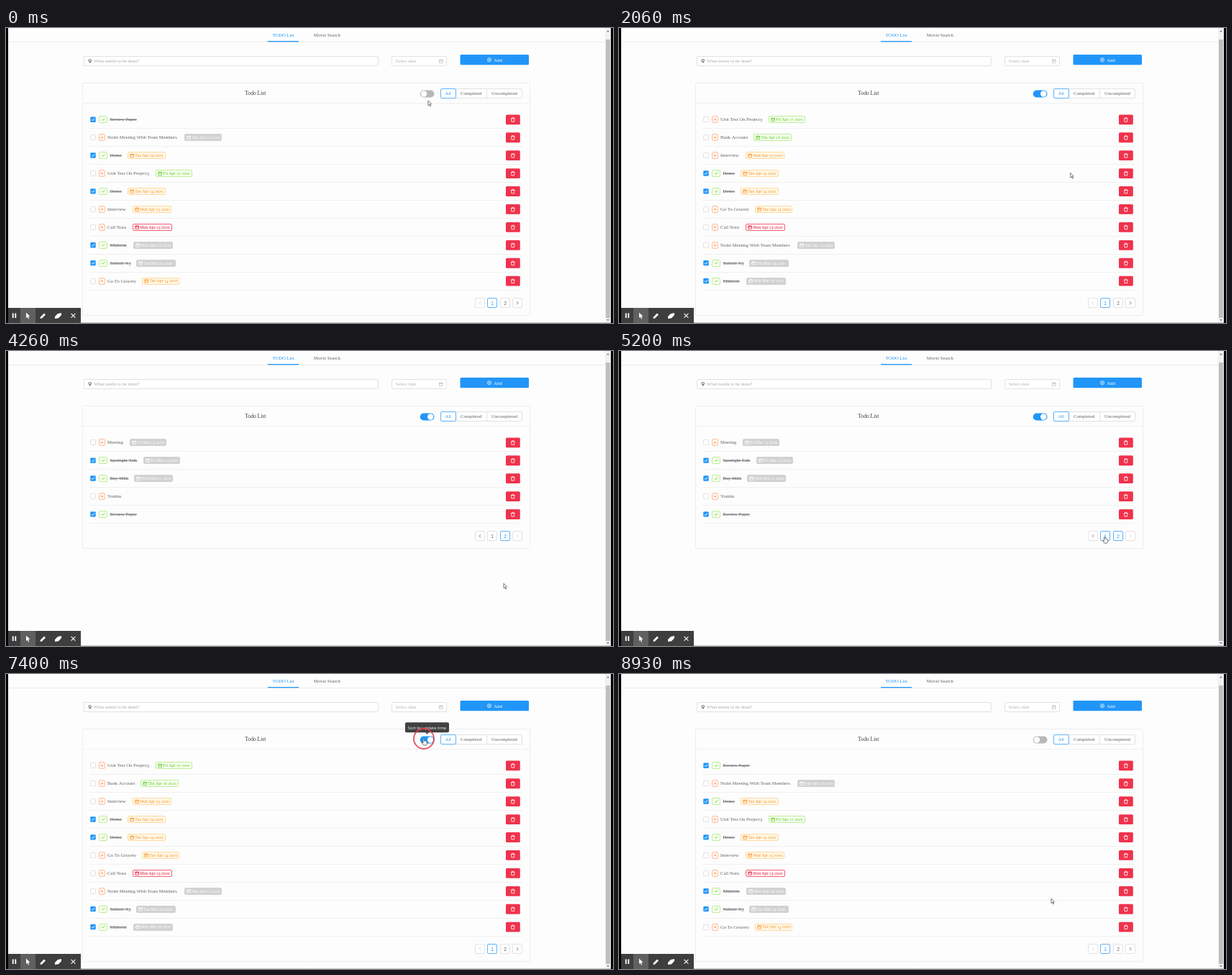
An HTML page with a canvas that plays this animation: 844 px wide and 410 px high, repeating every 9000 ms.

```html
<!DOCTYPE html>
<html lang="en">
<head>
<meta charset="utf-8">
<title>Todo List</title>
<style>
html, body { margin: 0; width: 100%; height: 100%; overflow: hidden; background: #fdfdfd; }
canvas { display: block; }
</style>
</head>
<body>
<canvas id="stage" width="844" height="410"></canvas>
<script>
const ctx = document.getElementById('stage').getContext('2d');
const LOOP = 9000, ROW = 24.93;
const SERIF = '"Liberation Serif", serif';
const SANS = '"Liberation Sans", sans-serif';
const BLUE = '#2196f8', TEXT = '#626262', LINE = '#e2e2e2', FAINT = '#f0f0f0';

// background, border, text
const TONES = {
  green: ['#f6ffed', '#bfed9c', '#58c722'],
  orange: ['#fff7e6', '#ffdba3', '#fa9022'],
  red: ['#fff0f0', '#f2667c', '#dc1f42'],
  gray: ['#d2d2d2', '#d2d2d2', '#ffffff'],
  minus: ['#fff2e8', '#ffc3a3', '#fa6a38']
};

// name, done, date, tone, tag left, tag right
const task = (name, done, date, tone, left, right) => ({ name, done, date, tone, left, right });
const review = task('Review Paper', true);
const zone = task('Nolm Meeting With Team Members', false, 'Sun Apr 12 2020', 'gray', 248, 300);
const demo = task('Demo', true, 'Tue Apr 14 2020', 'orange', 169, 222);
const unit = task('Unit Test On Project3', false, 'Fri Apr 17 2020', 'green', 208, 259);
const interview = task('Interview', false, 'Wed Apr 15 2020', 'orange', 176, 230);
const call = task('Call Nora', false, 'Mon Apr 13 2020', 'red', 176, 231);
const midterm = task('Midterm', true, 'Mon Mar 16 2020', 'gray', 177, 232);
const submit = task('Submit A3', true, 'Tue Mar 24 2020', 'gray', 181, 236);
const grocery = task('Go To Grocery', false, 'Tue Apr 14 2020', 'orange', 189, 241);
const bank = task('Bank Account', false, 'Thu Apr 16 2020', 'green', 187, 240);

const byUpdate = [review, zone, demo, unit, demo, interview, call, midterm, submit, grocery];
const byDate = [unit, bank, interview, demo, demo, grocery, call, zone, submit, midterm];
const secondPage = [
  task('Meeting', false, 'Fri Mar 13 2020', 'gray', 172, 223),
  task('Spotlight Talk', true, 'Fri Mar 13 2020', 'gray', 191, 242),
  task('Buy Milk', true, 'Wed Mar 11 2020', 'gray', 178, 232),
  task('Yombu', false),
  review
];

// time, x, y of the pointer tip
const PATH = [
  [0, 587, 101], [60, 587, 101], [450, 589, 92], [1600, 589, 92], [2700, 691, 380],
  [4130, 691, 380], [4260, 692, 323], [4950, 675.5, 258], [6060, 675.5, 258],
  [7080, 581, 90], [7850, 581, 90], [8900, 601, 312], [9000, 601, 312]
];
const HAND = [[300, 1640], [2620, 3400], [4800, 6110], [6980, 7930]];
const TIP = [[430, 1700], [7080, 7980]];
const CLICKS = [[1130, 1310], [3060, 3200], [5400, 5580], [7330, 7540]];

const clamp = v => Math.max(0, Math.min(1, v));
const ease = v => v * v * (3 - 2 * v);
const ramp = (t, a, b) => ease(clamp((t - a) / (b - a)));
const within = (t, spans) => spans.some(([a, b]) => t >= a && t < b);

function box(x, y, w, h, r, fill, stroke) {
  ctx.beginPath();
  if (stroke) ctx.roundRect(x + .5, y + .5, w - 1, h - 1, r);
  else ctx.roundRect(x, y, w, h, r);
  if (fill) { ctx.fillStyle = fill; ctx.fill(); }
  if (stroke) { ctx.strokeStyle = stroke; ctx.lineWidth = 1; ctx.stroke(); }
}

function line(points, color, width = 1) {
  ctx.beginPath();
  for (let i = 0; i < points.length; i += 2) ctx.lineTo(points[i], points[i + 1]);
  ctx.strokeStyle = color;
  ctx.lineWidth = width;
  ctx.stroke();
}

function shape(points, fill, stroke) {
  ctx.beginPath();
  for (let i = 0; i < points.length; i += 2) ctx.lineTo(points[i], points[i + 1]);
  ctx.closePath();
  ctx.fillStyle = fill;
  ctx.fill();
  if (stroke) { ctx.strokeStyle = stroke; ctx.lineWidth = .8; ctx.stroke(); }
}

function circle(x, y, r, fill, stroke, width = 1) {
  ctx.beginPath();
  ctx.arc(x, y, r, 0, Math.PI * 2);
  if (fill) { ctx.fillStyle = fill; ctx.fill(); }
  if (stroke) { ctx.strokeStyle = stroke; ctx.lineWidth = width; ctx.stroke(); }
}

function label(s, x, y, color, size = 6.67, center = false, family = SERIF) {
  ctx.font = size + 'px ' + family;
  ctx.fillStyle = color;
  const total = ctx.measureText(s).width;
  if (center) x -= total / 2;
  if (family !== SERIF) {
    ctx.fillText(s, x, y);
    return total;
  }
  // Old-style figures: low 0-2, hanging 3, 4, 5, 7 and 9.
  for (const part of s.split(/(\d)/)) {
    ctx.save();
    ctx.translate(x, y);
    if (/^[012]$/.test(part)) ctx.scale(1, .74);
    if (/^[34579]$/.test(part)) ctx.translate(0, size * .19);
    ctx.fillText(part, 0, 0);
    ctx.restore();
    x += ctx.measureText(part).width;
  }
  return total;
}

function calendar(x, y, color) {
  ctx.strokeStyle = color;
  ctx.lineWidth = .7;
  ctx.strokeRect(x, y - 1.8, 4.6, 4.1);
  line([x, y - .3, x + 4.6, y - .3], color, .7);
  line([x + 1.3, y - 2.7, x + 1.3, y - 1.2], color, .7);
  line([x + 3.3, y - 2.7, x + 3.3, y - 1.2], color, .7);
}

function trash(x, y) {
  line([x - 2.9, y - 1.7, x + 2.9, y - 1.7], '#fff', .8);
  line([x - 1.2, y - 1.7, x - 1.2, y - 2.9, x + 1.2, y - 2.9, x + 1.2, y - 1.7], '#fff', .7);
  line([x - 2.1, y - 1.5, x - 1.9, y + 2.7, x + 1.9, y + 2.7, x + 2.1, y - 1.5], '#fff', .8);
}

function drawTop() {
  ctx.fillStyle = '#fdfdfd';
  ctx.fillRect(0, 0, 844, 410);
  ctx.fillStyle = '#ececec';
  ctx.fillRect(3, 19, 830, 1);
  label('TODO List', 385.6, 12, BLUE, 6.67, true);
  label('Movie Search', 446.3, 12, TEXT, 6.67, true);
  ctx.fillStyle = BLUE;
  ctx.fillRect(364, 18, 43, 1.3);

  box(108, 39, 410, 14, 1.5, '#fff', LINE);
  shape([114.3, 45, 115.5, 43.3, 118, 43.3, 119.2, 45, 117.2, 48.6, 116.2, 48.6], '#777');
  circle(116.7, 45.2, 1.1, '#fff');
  label('What needs to be done?', 122, 48, '#a9a9a9');
  box(536, 39, 77, 14, 1.5, '#fff', LINE);
  label('Select date', 541.5, 48, '#b5b5b5');
  calendar(602.4, 46, '#bdbdbd');
  box(631.5, 37, 95.5, 14.3, 1.5, BLUE);
  circle(672, 44.2, 2.6, null, '#fff', .7);
  line([670.6, 44.2, 673.4, 44.2], '#fff', .7);
  line([672, 42.8, 672, 45.6], '#fff', .7);
  label('Add', 678.3, 46.5, '#fff');
}

function drawRow(item, y) {
  if (item.done) {
    box(117.3, y - 3.7, 7.4, 7.4, 1, BLUE);
    line([119, y, 120.5, y + 1.6, 123, y - 1.6], '#fff', 1);
    box(129, Math.round(y - 5), 12, 10, 1.5, TONES.green[0], TONES.green[1]);
    line([133, y + .1, 134.4, y + 1.5, 137.2, y - 1.7], TONES.green[2], .8);
  } else {
    box(117, Math.round(y - 4), 8, 8, 1, '#fff', '#e0e0e0');
    box(129, Math.round(y - 5), 9, 10, 1.5, TONES.minus[0], TONES.minus[1]);
    line([132, y + .1, 135, y + .1], TONES.minus[2], .8);
  }
  const x = item.done ? 144.5 : 141;
  const width = label(item.name, x, y + 2, TEXT);
  if (item.done) line([x, y + .2, x + width, y + .2], '#555', .7);
  if (item.date) {
    const [fill, border, ink] = TONES[item.tone];
    box(item.left, Math.round(y - 5), item.right - item.left, 10, 1.5, fill, border);
    calendar(item.left + 3.8, y + .1, ink);
    label(item.date, item.left + 10.3, y + 1.9, ink, 5.72);
  }
  box(695, y - 6.8, 19.8, 13.8, 1.5, '#f0324c');
  trash(704.8, y + .3);
}

function pageButton(x, y, text, active, hover, disabled) {
  const color = active || hover ? BLUE : disabled ? '#cfcfcf' : '#666';
  box(x - 7, y - 7, 14, 14, 1.5, '#fff', active || hover ? '#5fb2fa' : LINE);
  if (text === '<') line([x + 1.2, y - 2, x - 1, y + .2, x + 1.2, y + 2.4], color, .8);
  else if (text === '>') line([x - 1, y - 2, x + 1.2, y + .2, x - 1, y + 2.4], color, .8);
  else label(text, x, y + 2.5, color, 6.67, true, SANS);
}

function drawSwitch(t) {
  const tint = ramp(t, 1220, 1450) - ramp(t, 7540, 7770);
  const slide = ramp(t, 1300, 1540) - ramp(t, 7540, 7780);
  const mix = (a, b) => Math.round(a + (b - a) * tint);
  box(575.7, 86.4, 19.8, 10.2, 5.1, `rgb(${mix(184, 33)},${mix(184, 150)},${mix(184, 248)})`);
  circle(581 + slide * 9.2, 91.5, 4.2, '#fff');
}

function drawCard(t) {
  const second = t >= 3200 && t < 5730;
  const sorted = t >= 1320 && t < 7560;
  const items = second ? secondPage : sorted ? byDate : byUpdate;
  const n = items.length;
  const bottom = Math.round(150.2 + ROW * n);
  box(106, 76, 623, bottom - 76, 1, null, '#ededed');
  ctx.fillStyle = FAINT;
  ctx.fillRect(107, 104, 621, 1);
  label('Todo List', 346.8, 93, '#3c3c3c', 7.55, true);
  drawSwitch(t);

  box(625, 84, 44, 14, 0, '#fff', LINE);
  box(668, 84, 50, 14, 1.5, '#fff', LINE);
  box(604, 84, 22, 14, 1.5, '#fff', '#5fb2fa');
  label('All', 614.7, 93, BLUE, 6.67, true);
  label('Completed', 646.6, 93, TEXT, 6.67, true);
  label('Uncompleted', 693, 93, TEXT, 6.67, true);

  items.forEach((item, i) => {
    const y = 127.2 + ROW * i;
    drawRow(item, y);
    ctx.fillStyle = FAINT;
    ctx.fillRect(117, Math.round(y + 12), 600, 1);
  });

  const y = Math.round(132.7 + ROW * n);
  pageButton(659, y, '<', false, false, !second);
  pageButton(676, y, '1', !second, t > 4850 && t < 5730);
  pageButton(694, y, '2', second, t > 2640 && t < 3200);
  pageButton(711, y, '>', false, false, second);
}

function drawFrame() {
  ctx.fillStyle = '#f1f1f1';
  ctx.fillRect(833, 0, 8, 410);
  ctx.fillStyle = '#bfbfbf';
  ctx.fillRect(834, 16, 6, 387);
  shape([835.2, 5.2, 837, 3.2, 838.8, 5.2], '#666');
  shape([835.2, 405, 837, 407, 838.8, 405], '#666');
  ctx.fillStyle = '#c4c4c4';
  ctx.fillRect(3, 409, 838, 1);
  ctx.fillStyle = '#000';
  ctx.fillRect(0, 0, 3, 410);
  ctx.fillRect(841, 0, 3, 410);

  ctx.fillStyle = '#3e3e3e';
  ctx.fillRect(3, 389, 101, 21);
  ctx.fillStyle = '#606060';
  ctx.fillRect(20, 389, 21, 21);
  ctx.fillStyle = '#fff';
  ctx.fillRect(8.8, 396.4, 1.8, 6.6);
  ctx.fillRect(12.4, 396.4, 1.8, 6.6);
  shape([28, 395.5, 28, 403, 29.8, 401.5, 31, 404.4, 32.2, 403.8, 31, 401, 33.4, 400.8], '#fff');
  shape([47.5, 404, 48, 401.6, 53, 396.6, 55, 398.4, 50, 403.5], '#fff');
  shape([68, 401, 72, 397, 77, 396, 77, 399, 73, 403.2, 68, 404], '#fff');
  line([90.6, 396.8, 96.4, 402.6], '#fff', 1.1);
  line([96.4, 396.8, 90.6, 402.6], '#fff', 1.1);
}

function drawTip(t) {
  for (const [a, b] of TIP) {
    const alpha = ramp(t, a, a + 110) * (1 - ramp(t, b - 110, b));
    if (!alpha) continue;
    ctx.globalAlpha = alpha;
    box(555, 67.3, 61, 14, 2, '#414141');
    shape([583, 81.2, 588, 81.2, 585.5, 83.8], '#414141');
    label('Sort by update time', 585.4, 76.6, '#fff', 5.8, true, '"Open Sans", sans-serif');
    ctx.globalAlpha = 1;
  }
}

function pointer(t) {
  const i = Math.max(1, PATH.findIndex(p => p[0] > t));
  const [a, x0, y0] = PATH[i - 1], [b, x1, y1] = PATH[i];
  const k = ramp(t, a, b);
  return [x0 + (x1 - x0) * k, y0 + (y1 - y0) * k];
}

function drawPointer(t) {
  const [x, y] = pointer(t);
  for (const [a, b] of CLICKS) {
    if (t < a || t >= b) continue;
    const grow = clamp((t - a) / 70);
    circle(x, y, 7 + 7 * grow, null, 'rgba(222,58,72,.85)', 1.9);
  }
  ctx.save();
  ctx.translate(x, y);
  if (within(t, HAND)) {
    shape([-1, .6, -.3, 0, .5, .6, .6, 3, 2.2, 3.1, 3.7, 3.6, 4.3, 4.5, 4, 7, 3.2, 9,
      -.6, 9, -2.7, 6.2, -2.6, 5.1, -1, 6], '#fff', '#555');
  } else {
    shape([0, 0, 0, 6.6, 1.5, 5.3, 2.6, 7.8, 3.6, 7.4, 2.6, 5, 4.5, 4.8], '#fff', '#555');
  }
  ctx.restore();
}

function draw(now) {
  const t = now % LOOP;
  drawTop();
  drawCard(t);
  drawFrame();
  drawTip(t);
  drawPointer(t);
}

const start = performance.now();
function tick() {
  draw(performance.now() - start);
  requestAnimationFrame(tick);
}
tick();
</script>
</body>
</html>
```
